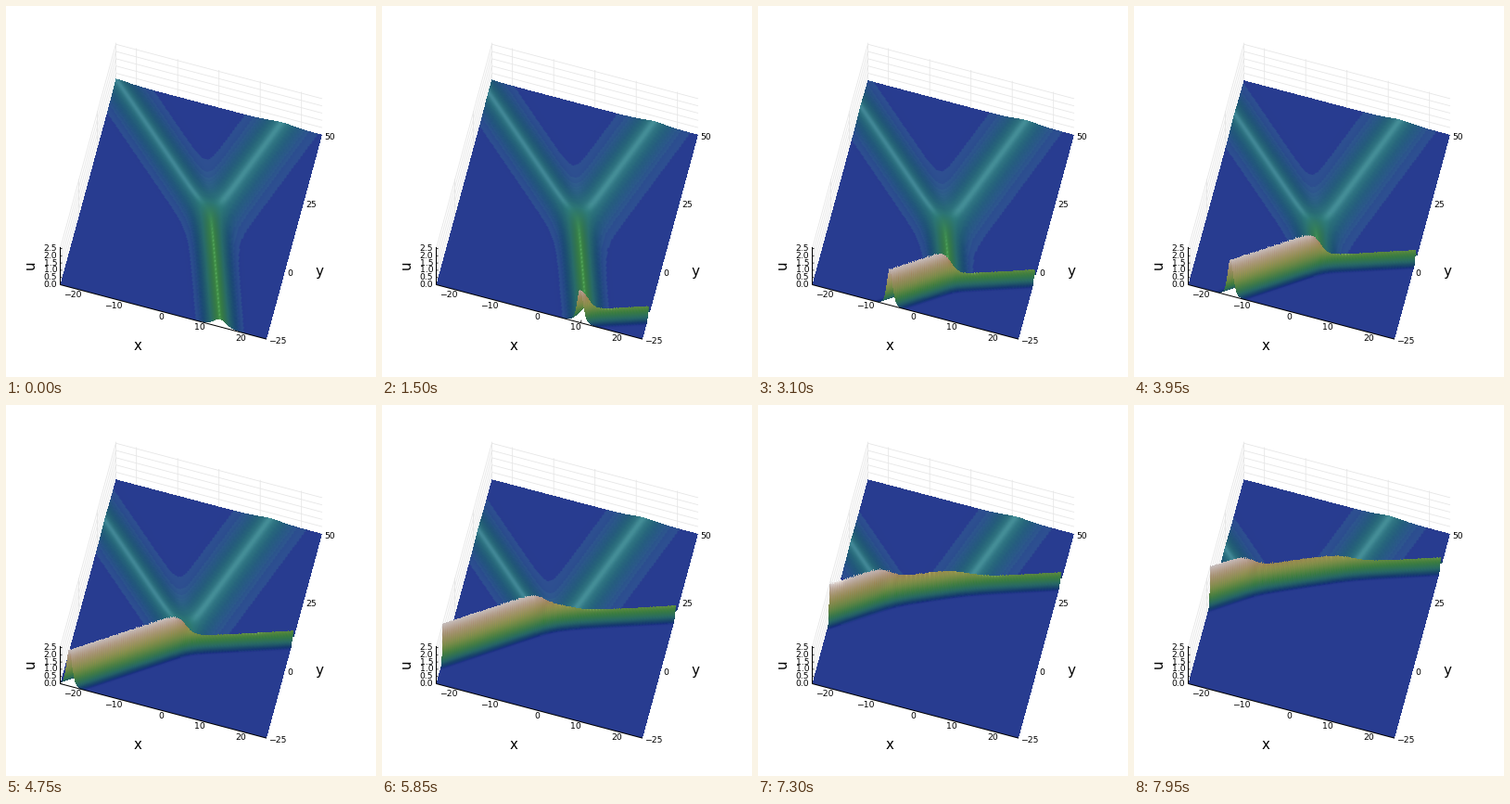
Write a matplotlib script that moves like this. It is 399x400 px and loops after 8 s.

```python
import numpy as np
import matplotlib.pyplot as plt
from matplotlib.animation import FuncAnimation

W, H, DPI = 399, 400, 100
FRAMES, STEP = 160, 50

# Orthographic view: pixels per unit along x, y and u
OX, OY = 58.5, 300.5
XX, XY = 4.45, 1.1735
YX, YY = 0.799, -2.937
ZY = 15.6
ZTOP = 2.6
SPAN_X, SPAN_Y = 50, 75

# Four-phase line soliton of the KP equation
K = np.array([0.635, 0.135, -0.395, -1.64])
SHIFT = np.array([6.75, 0.0, -1.17, -107.1])
RATE = 0.245

NX, NY, DEPTH = 151, 226, 500
gx = np.linspace(-25, 25, NX)
gy = np.linspace(-25, 50, NY)[:, None]

levels = np.arange(256) / 98
tone = 0.087 + 0.363 * (levels / 0.53) ** 0.58
PALETTE = plt.get_cmap("gist_earth")(np.clip(tone, 0, 1))[:, :3]
VIEW = (0.045, -0.168, 0.985)


def project(x, y, u=0.0):
    return (OX + XX * (x + 25) + YX * (y + 25),
            OY + XY * (x + 25) + YY * (y + 25) - ZY * u)


def height(step):
    phase = [d - (k * gx + k * k * gy + RATE * k ** 3 * step)
             for k, d in zip(K, SHIFT)]
    top = np.maximum.reduce(phase)
    e = [np.exp(p - top) for p in phase]
    total = sum(e)
    mean = sum(k * w for k, w in zip(K, e)) / total
    square = sum(k * k * w for k, w in zip(K, e)) / total
    return 2 * (square - mean ** 2)


def shaded(u):
    uy, ux = np.gradient(u, SPAN_Y / (NY - 1), SPAN_X / (NX - 1))
    sx, sy = 19.4 * ux, 29.1 * uy
    steep = sx ** 2 + sy ** 2
    facing = np.abs(VIEW[2] - VIEW[0] * sx - VIEW[1] * sy) / np.sqrt(1 + steep)
    light = 0.76 + 0.24 * facing
    gloss = 0.1 * np.exp(-steep / 0.18)
    index = np.clip(np.rint(u * 98), 0, 255).astype(int)
    return np.clip(PALETTE[index] * light[..., None] + gloss[..., None], 0, 1)


def cell(i, j):
    ci = np.clip(i.astype(int), 0, NX - 2)
    cj = np.clip(j.astype(int), 0, NY - 2)
    return cj * NX + ci, i - ci, j - cj


def blend(flat, at, a, b):
    low = flat[at] * (1 - a) + flat[at + 1] * a
    high = flat[at + NX] * (1 - a) + flat[at + NX + 1] * a
    return low * (1 - b) + high * b


# Each pixel column is a slice through the surface, front to back
cols = np.arange(59, 341)
offset = cols + 0.5 - OX
front = np.maximum(0, (offset - XX * SPAN_X) / YX)
back = np.minimum(SPAN_Y, offset / YX)
slice_y = front + (back - front) * np.linspace(0, 1, DEPTH)[:, None]
slice_x = (offset - YX * slice_y) / XX
base = OY + XY * slice_x + YY * slice_y
mesh_i = np.clip(slice_x / SPAN_X, 0, 1) * (NX - 1)
mesh_j = np.clip(slice_y / SPAN_Y, 0, 1) * (NY - 1)
slice_cell = cell(mesh_i, mesh_j)
lane = np.arange(len(cols))[None, :]
order = np.arange(DEPTH)[::-1, None]


def nearest(edge):
    hit = np.full((H, len(cols)), DEPTH)
    hit[np.clip(edge[::-1], 0, H - 1), lane] = order
    return hit


def render(step):
    u = height(step)
    rows = base - ZY * blend(u.ravel(), *slice_cell)
    above = np.ceil(np.minimum.accumulate(rows, 0) - 0.5).astype(int)
    below = np.floor(np.maximum.accumulate(rows, 0) - 0.5).astype(int)
    up = np.minimum.accumulate(nearest(above), 0)
    down = np.minimum.accumulate(nearest(below)[::-1], 0)[::-1]
    hit = np.where(up == 0, down, up)

    r, c = np.nonzero((hit > 0) & (hit < DEPTH))
    s = hit[r, c]
    far, near = rows[s, c], rows[s - 1, c]
    f = np.clip((r + 0.5 - far) / (near - far), 0, 1)
    i = mesh_i[s, c] + (mesh_i[s - 1, c] - mesh_i[s, c]) * f
    j = mesh_j[s, c] + (mesh_j[s - 1, c] - mesh_j[s, c]) * f
    at, a, b = cell(i, j)
    rgb = blend(shaded(u).reshape(-1, 3), at, a[:, None], b[:, None])

    image = np.zeros((H, W, 4), np.uint8)
    image[r, cols[c], :3] = np.rint(rgb * 255)
    image[r, cols[c], 3] = 255
    return image


fig = plt.figure(figsize=(W / DPI, H / DPI), dpi=DPI, facecolor="white")
ax = fig.add_axes([0, 0, 1, 1])
ax.set_xlim(0, W)
ax.set_ylim(H, 0)
ax.axis("off")


def line(p, q, color="black", width=0.8, z=1):
    ax.plot([p[0], q[0]], [p[1], q[1]], color=color, lw=width * 0.72,
            zorder=z, solid_capstyle="butt", snap=False)


def label(x, y, text, size=9.3, **kw):
    ax.text(x, y, text, fontsize=size * 0.72, family="DejaVu Sans",
            va="center", zorder=6, **kw)


def minus(n):
    return str(n).replace("-", "\u2212")


GRID = "#e6e6e6"
for x in range(-20, 21, 10):
    line(project(x, 50), project(x, 50, ZTOP), GRID)
    px, py = project(x, -25)
    line((px, py), project(x, -24), z=2)
    label(px + 0.4, py + 5.2, minus(x), ha="right")

for y in (-25, 0, 25, 50):
    line(project(-25, y), project(-25, y, ZTOP), GRID)
    px, py = project(25, y)
    label(px + 2.4, py + 2.3, minus(y), ha="left")

for n in range(6):
    z = n / 2
    line(project(-25, 50, z), project(25, 50, z), GRID)
    line(project(-25, -25, z), project(-25, 50, z), GRID)
    px, py = project(-25, -25, z)
    line((px, py), (px + 2, py), z=2)
    label(55.3, py, f"{z:.1f}", ha="right")

line(project(-25, -25), project(25, -25), width=1, z=5)
line(project(-25, -25), project(-25, -25, ZTOP), width=1, z=5)
label(142, 366.5, "x", 15, ha="center")
label(338, 287, "y", 15, ha="center")
label(26, 279.5, "u", 15, ha="center", rotation=90)

surface = ax.imshow(render(0), extent=(0, W, H, 0), interpolation="nearest",
                    aspect="auto", zorder=3)


def update(step):
    surface.set_data(render(step))
    return (surface,)


anim = FuncAnimation(fig, update, frames=FRAMES, interval=STEP, repeat=True,
                     repeat_delay=0, blit=False)
plt.show()
```
